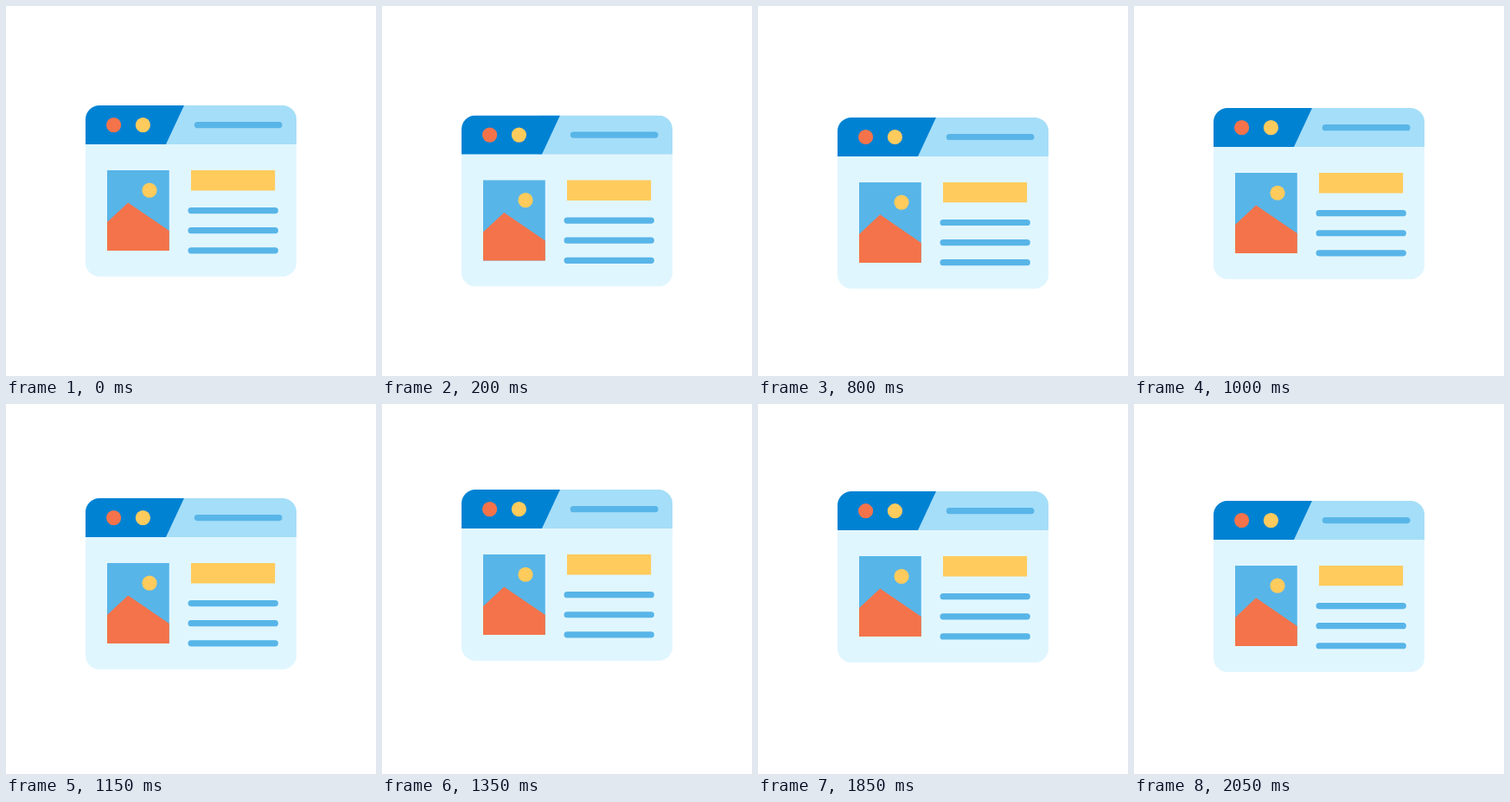
Animation, 428 px wide and 428 px high, one loop 2100 ms. Source, as an HTML page:

```html
<!DOCTYPE html>
<html lang="en">
<head>
<meta charset="utf-8">
<title>Floating browser window</title>
<style>
  html, body { margin: 0; width: 100%; height: 100%; overflow: hidden; background: #fff; }
  svg { display: block; width: 100vw; height: 100vh; }
  .blue { fill: #58b5e8; }
  .yellow { fill: #ffcb5c; }
  .orange { fill: #f4734a; }
  .lines { fill: none; stroke: #58b5e8; stroke-width: 7.2; stroke-linecap: round; }
</style>
</head>
<body>
<svg viewBox="0 0 428 428">
  <clipPath id="frame"><rect x="92" y="115" width="244" height="198" rx="16"/></clipPath>
  <g id="win">
    <g clip-path="url(#frame)">
      <path fill="#e0f6ff" d="M92 159H336V313H92z"/>
      <path fill="#a5def8" d="M180 115H336V160H180z"/>
      <path fill="#0082d3" d="M92 115H206L185 160H92z"/>
    </g>
    <circle class="orange" cx="124.6" cy="137.6" r="8.6"/>
    <circle class="yellow" cx="158.4" cy="137.6" r="8.6"/>
    <path class="blue" d="M117 190H188.8V283H117z"/>
    <circle class="yellow" cx="166" cy="213.2" r="8.6"/>
    <path class="orange" d="M117 250L141.2 227.4L188.8 260V283H117z"/>
    <path class="yellow" d="M214 190H311.2V213.4H214z"/>
    <path class="lines" d="M221.4 137.6H315.9M214.1 236.6H311.3M214.1 259.7H311.3M214.1 282.8H311.3"/>
  </g>
</svg>
<script>
  const LOOP = 2100, STEP = 50, SWING = 20.4;
  const win = document.getElementById('win');
  const start = performance.now();

  function draw() {
    const time = (performance.now() - start) % LOOP;
    const held = Math.floor(time / STEP) * STEP;
    const dy = SWING * Math.sin(2 * Math.PI * held / LOOP);
    win.setAttribute('transform', `translate(0 ${dy.toFixed(3)})`);
    requestAnimationFrame(draw);
  }
  draw();
</script>
</body>
</html>
```
